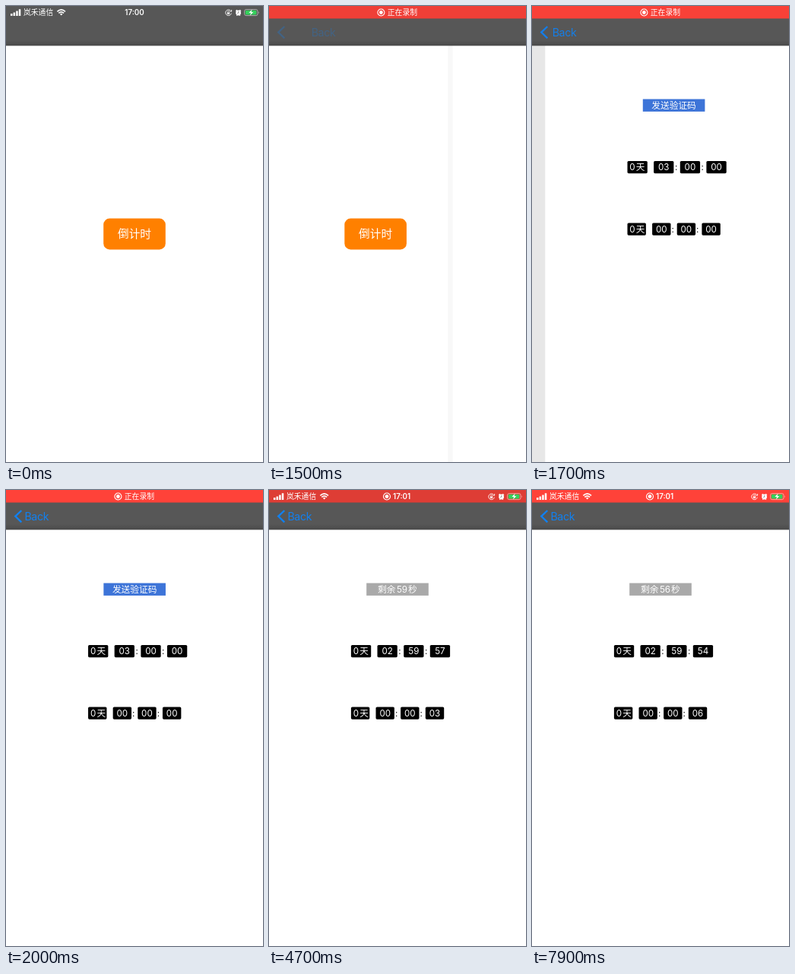
Write an HTML page that moves like this. It is 338x600 px and loops after 8000 ms.

```html
<!DOCTYPE html>
<html lang="zh-CN">
<head>
<meta charset="utf-8">
<title>倒计时</title>
<style>
  html, body { margin: 0; width: 100%; height: 100%; overflow: hidden; background: #fff; }
  svg { display: block; width: 338px; height: 600px; }
  text { font-family: Inter, "Noto Sans CJK SC", "Noto Sans CJK", sans-serif; fill: #fff; }
  .mid { text-anchor: middle; }
  .status { font-size: 9.8px; }
  .clock { font-weight: 600; }
  .timer { font-size: 11.6px; }
  .colon { fill: #111; }
</style>
</head>
<body>
<svg viewBox="0 0 338 600">
  <defs>
    <linearGradient id="edge" x2="0" y2="1">
      <stop offset="0" stop-color="#000" stop-opacity="0"/>
      <stop offset="1" stop-color="#000" stop-opacity=".16"/>
    </linearGradient>
    <g id="record">
      <circle r="4.5" fill="none" stroke="#fff" stroke-width="1.1"/>
      <circle r="2.4" fill="#fff"/>
    </g>
  </defs>

  <rect width="338" height="600" fill="#fff"/>
  <g id="home">
    <rect x="128.2" y="279.6" width="81.6" height="40.8" rx="8" fill="#ff8000"/>
    <text class="mid" x="169" y="305.4" font-size="14.7">倒计时</text>
  </g>
  <rect id="shade" y="52" height="548"/>

  <g id="detail">
    <rect y="52" width="338" height="548" fill="#fff"/>
    <rect id="sendBox" x="128.2" y="122.5" width="81.6" height="16.4"/>
    <text id="sendText" class="mid" x="169" y="135.1" font-size="11.7">发送验证码</text>
    <g id="waitText" font-size="11.7">
      <text x="143" y="135.1">剩余</text>
      <text id="wait" class="mid" x="175" y="135.1"></text>
      <text x="183" y="135.1">秒</text>
    </g>
    <g id="timers"></g>
  </g>

  <rect width="338" height="52.3" fill="#575757"/>
  <rect y="45" width="338" height="7.3" fill="url(#edge)"/>
  <path id="chevron" d="M20.3 27 12.3 34.6 20.3 42.3" fill="none" stroke="#1180f0" stroke-width="2.4"/>
  <text id="back" y="39.6" font-size="14.2" letter-spacing="-.35" style="fill:#1180f0">Back</text>

  <rect id="red" width="338" height="16.5"/>
  <g id="recording" class="status">
    <use href="#record" x="147.4" y="8.5"/>
    <text x="155.8" y="12.3">正在录制</text>
  </g>
  <g id="info" class="status">
    <path d="M6 10h2.5v3H6zM9.6 8.4h2.5V13H9.6zM13.2 6.4h2.5V13h-2.5zM16.8 4.2h2.5V13h-2.5z" fill="#fff"/>
    <text x="23" y="12.3">岚禾通信</text>
    <g fill="none" stroke="#fff" stroke-width="1.7">
      <path d="M67.4 7.3Q72.7 2.6 78 7.3M69.3 9.4Q72.7 6.4 76.1 9.4"/>
      <path d="M70.9 10.4Q72.7 9.2 74.5 10.4L72.7 12.6Z" fill="#fff" stroke="none"/>
    </g>
    <g id="plainClock"><text class="mid clock" x="169" y="12.2">17:00</text></g>
    <g id="redClock">
      <use href="#record" x="155" y="8.5"/>
      <text class="clock" x="163" y="12.2">17:01</text>
    </g>
    <g fill="none" stroke="#fff">
      <path d="M295.4 6.2A3.8 3.8 0 1 0 296.3 9.6M296.6 5v2.2h-2.2" stroke-width=".9"/>
      <path d="M291.5 8.7V7.6a1 1 0 0 1 2 0v1.1" stroke-width=".7"/>
      <rect x="290.9" y="8.5" width="3.2" height="2.4" fill="#fff" stroke="none"/>
      <path d="M302.2 6.6 304 5.1M309 6.6 307.2 5.1M303.3 12.6 304.1 11.8M307.9 12.6 307.1 11.8" stroke-width="1.2"/>
      <circle cx="305.6" cy="9" r="3.4" fill="#fff" stroke="none"/>
      <path d="M305.6 7V9.2L304.2 10" stroke="#666" stroke-width=".7"/>
      <rect x="313.6" y="4.6" width="17.4" height="8" rx="2.2" stroke-opacity=".55" stroke-width=".9"/>
      <path d="M332.2 7.2q1.4 1.4 0 2.8z" fill="#fff" fill-opacity=".6" stroke="none"/>
    </g>
    <rect x="314.8" y="5.8" width="14.6" height="5.6" rx="1.1" fill="#35d05c"/>
    <path d="M323.6 4.6 319.4 9.1H322L321 12.6 325.3 8H322.6Z" fill="#fff"/>
  </g>
</svg>

<script>
const LOOP = 8000;
const PUSH_AT = 1443;   // the second page starts sliding in
const TICK_AT = 1600;   // timers count whole seconds from here
const SEND_AT = 4400;   // the code button turns into a countdown

const el = id => document.getElementById(id);
const ramp = (t, from, to) => Math.min(1, Math.max(0, (t - from) / (to - from)));
const two = n => String(n).padStart(2, '0');
const set = (id, attrs) => {
  for (const name in attrs) el(id).setAttribute(name, attrs[name]);
};

function timerRow(y, width, starts, colons) {
  const box = x => `<rect x="${x}" y="${y}" width="${width}" height="16.2" rx="1.6"/>`;
  const label = (x, text, kind) =>
    `<text class="mid timer ${kind}" x="${x}" y="${y + 12.2}">${text}</text>`;
  const row = document.createElementNS('http://www.w3.org/2000/svg', 'g');
  row.innerHTML = starts.map(box).join('')
    + label(starts[0] + 6.5, '0', '')
    + label(starts[0] + 17.2, '天', '')
    + starts.slice(1).map(x => label(x + width / 2, '', 'num')).join('')
    + colons.map(x => label(x, ':', 'colon')).join('');
  el('timers').append(row);
  const nums = row.querySelectorAll('.num');
  return seconds => {
    const parts = [seconds / 3600, seconds / 60 % 60, seconds % 60];
    parts.forEach((n, i) => { nums[i].textContent = two(Math.floor(n)); });
  };
}

const showDown = timerRow(204, 26.3, [107.9, 142.5, 177.2, 211.8], [172, 206.6]);
const showUp = timerRow(285.5, 24.4, [107.9, 140.5, 173.1, 205.8], [167.6, 200.2]);

// Critically damped spring from 0 to 1
function pushProgress(t) {
  const k = Math.max(0, t - PUSH_AT) * 0.0182;
  return 1 - (1 + k) * Math.exp(-k);
}

function drawPages(t) {
  const p = pushProgress(t);
  const rest = 1 - p;
  const left = 338 * rest;
  const strip = Math.min(left, 6.5 + 32 * Math.max(0, p - 0.29));
  set('home', { transform: `translate(${-101.4 * p} 0)` });
  set('detail', { transform: `translate(${left} 0)` });
  set('shade', { x: left - strip, width: strip, opacity: p > 0 ? 0.1 * p : 0 });
  set('chevron', { opacity: p });
  set('back', { x: 24.4 + 43.7 * rest, opacity: p });
}

function drawTimers(t) {
  const ticks = Math.max(0, Math.floor((t - TICK_AT) / 1000));
  showDown(3 * 3600 - ticks);
  showUp(ticks);

  const waiting = t >= SEND_AT;
  set('sendBox', { fill: waiting ? '#a9a9a9' : '#3d74d8' });
  set('sendText', { opacity: waiting ? 0 : 1 });
  set('waitText', { opacity: waiting ? 1 : 0 });
  el('wait').textContent = 59 - Math.max(0, Math.floor((t - SEND_AT) / 1000));
}

function drawStatus(t) {
  const glow = 0.5 + 0.5 * Math.cos((t - 1950) / 1000 * Math.PI);
  const mix = (a, b) => Math.round(a + (b - a) * glow);
  const start = ramp(t, 100, 500);
  const swap = ramp(t, 3250, 3600);
  set('red', { fill: `rgb(${mix(216, 255)},${mix(60, 66)},${mix(52, 57)})`, opacity: start });
  set('recording', { opacity: start * (1 - swap) });
  set('info', { opacity: t < 2000 ? 1 - start : swap });
  set('plainClock', { opacity: t < 2000 ? 1 : 0 });
  set('redClock', { opacity: t < 2000 ? 0 : 1 });
}

const begin = performance.now();
function frame() {
  const t = (performance.now() - begin) % LOOP;
  drawPages(t);
  drawTimers(t);
  drawStatus(t);
  requestAnimationFrame(frame);
}
frame();
</script>
</body>
</html>
```
